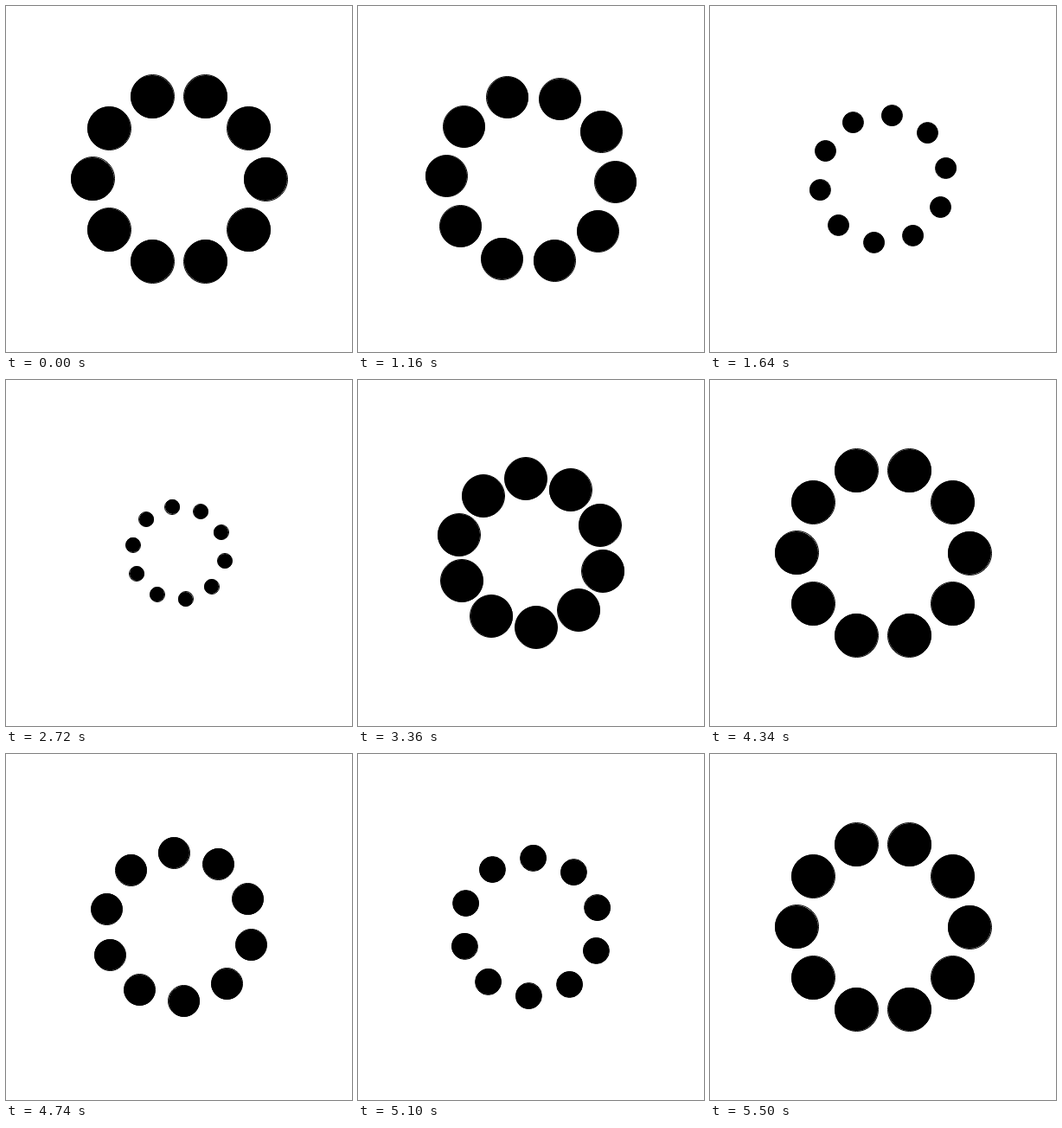
Animation of 400x400 px, one loop 5660 ms. Source, as an HTML page with a canvas:

```html
<!DOCTYPE html>
<html>
<head>
<meta charset="utf-8">
<style>
html, body { margin: 0; width: 100%; height: 100%; overflow: hidden; background: #fff; }
canvas { display: block; }
</style>
</head>
<body>
<canvas id="stage" width="400" height="400"></canvas>
<script>
const ctx = document.getElementById('stage').getContext('2d');
const STEP = 20, STEPS = 283, DOTS = 10;
// Single-precision pi: keeps the half-turn dot just above the axis.
const DEG = 3.14159274 / 180;

// Each squeeze closes one unit per step, then opens again: [turning step, depth]
const squeezes = [[119, 63], [205, 12], [249, 26]];

function depthAt(n) {
  return Math.max(...squeezes.map(([turn, depth]) => depth - Math.abs(n - turn)), 0);
}

// The diameter is clamped to 0..50, so after the deep squeeze it regrows at once.
function sizeAt(n, depth) {
  const [turn, full] = squeezes[0];
  return n >= turn && n <= turn + full
    ? Math.min(50, n - turn)
    : Math.max(0, 50 - depth);
}

function circle(x, y, r) {
  ctx.beginPath();
  ctx.arc(x, y, r, 0, 2 * Math.PI);
}

function draw(n) {
  const depth = depthAt(n), r = sizeAt(n, depth) / 2, ring = 100 - depth;
  const snap = v => Math.floor(v - r) + 0.5 + r;
  ctx.fillStyle = '#fff';
  ctx.fillRect(0, 0, 400, 400);
  if (!r) return;
  ctx.fillStyle = ctx.strokeStyle = '#000';
  ctx.lineWidth = 1;
  for (let i = 0; i < DOTS; i++) {
    const a = (i * 360 / DOTS + depth) * DEG;
    const x = 200 + ring * Math.cos(a), y = 200 + ring * Math.sin(a);
    circle(x, y, r);
    ctx.fill();
    // The outline sits on the pixel grid, the fill does not.
    circle(snap(x), snap(y), r);
    ctx.stroke();
  }
}

const start = performance.now();
function tick() {
  draw(Math.floor((performance.now() - start) / STEP) % STEPS);
  requestAnimationFrame(tick);
}
tick();
</script>
</body>
</html>
```
